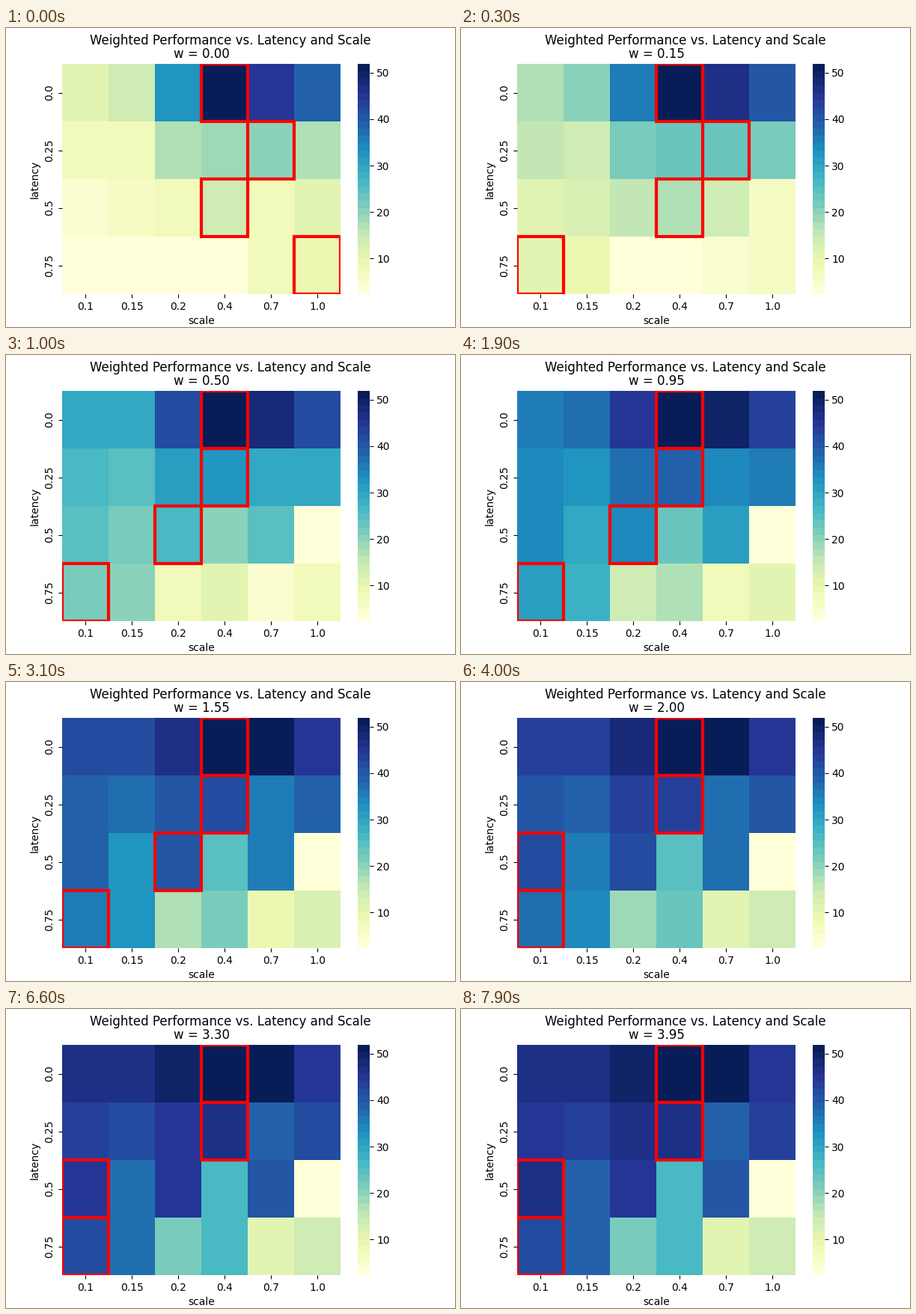
These frames come from a looping animation (600x400 px, 8 s). A matplotlib script:

```python
import numpy as np
import matplotlib.pyplot as plt
from matplotlib.animation import FuncAnimation
from matplotlib.patches import Rectangle

FRAMES, INTERVAL, STEP = 80, 100, 0.05
LOW, HIGH = 2.31, 51.91
W_END = (FRAMES - 1) * STEP
SCALES = ["0.1", "0.15", "0.2", "0.4", "0.7", "1.0"]
LATENCIES = ["0.0", "0.25", "0.5", "0.75"]

col = np.arange(6)
row = np.arange(4)[:, None]


def through(*points):
    """One heatmap row, straight between a few (column, score) points."""
    return np.interp(col, *zip(*points))


def alternate(even, odd):
    """One heatmap row whose even and odd columns follow separate curves."""
    return np.where(col % 2 == 0, even, odd)


# Scores at the first and at the last weight
first = np.array([
    through((0, 11.3), (1, 14), (3, 52), (5, 38.3)),
    through((1, 8.5), (2, 16.5), (4, 20.8), (5, 17.2)),
    through((0, 4.2), (2, 8.5), (3, 14.2), (4, 8.5), (5, 11.5)),
    through((3, 3.5), (4, 8.5), (5, 9)),
])
last = np.array([
    through((1, 47.1), (3, 52), (4, 52), (5, 45.5)),
    alternate(46.3 - 1.03 * (col - 1.3) ** 2, 46.5 - 0.93 * (col - 3) ** 2),
    alternate(46.4 - 0.09 * col ** 3, 40 - 1.5 * col ** 2),
    alternate(42 * np.exp(-0.335 * col), 44.5 - 6 * col),
])
# The slow, large corner loses a little before it gains
dip = np.where(3 * row + col >= 11, 5, 0)


def saturate(w):
    return w ** 1.2 / (w ** 1.2 + 0.55)


def scores(w):
    gain = saturate(w) / saturate(W_END)
    early = w / 0.35 * np.exp(1 - w / 0.35)
    return first + (last - first) * gain - dip * early


plt.rcParams["font.family"] = "DejaVu Sans"
fig, ax = plt.subplots(figsize=(6, 4), dpi=100)
fig.suptitle("Weighted Performance vs. Latency and Scale")

mesh = ax.pcolormesh(scores(0), cmap=plt.get_cmap("YlGnBu", 32),
                     vmin=LOW, vmax=HIGH)
bar = fig.colorbar(mesh, ax=ax)
bar.outline.set_linewidth(0)
bar.set_ticks(range(10, 51, 10))

ax.set(xlim=(0, 6), ylim=(4, 0), xlabel="scale", ylabel="latency")
ax.set_xticks(col + 0.5, SCALES)
ax.set_yticks(row.ravel() + 0.5, LATENCIES, rotation="vertical", va="center")
ax.spines[:].set_visible(False)
title = ax.set_title("w = 0.00")

boxes = [ax.add_patch(Rectangle((0, y), 1, 1, fill=False, edgecolor="red", lw=3))
         for y in range(4)]


def update(i):
    w = i * STEP
    grid = scores(w)
    mesh.set_array(grid)
    title.set_text(f"w = {w:.2f}")
    for box, best in zip(boxes, grid.argmax(axis=1)):
        box.set_x(best)
    return [mesh, title, *boxes]


anim = FuncAnimation(fig, update, frames=FRAMES, interval=INTERVAL,
                     repeat=True, repeat_delay=0, blit=False)
plt.show()
```
